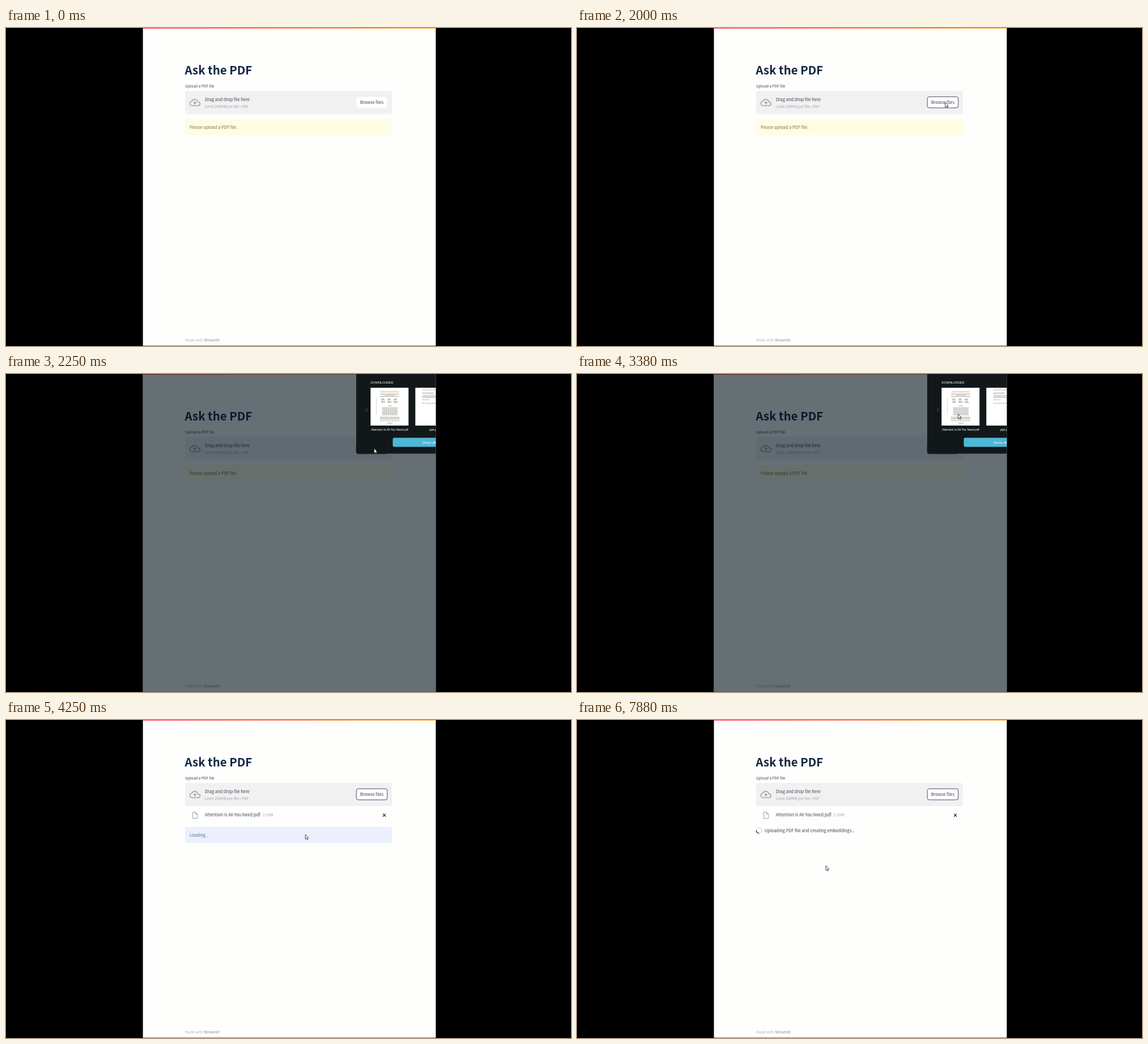
Animation, 997 px wide and 561 px high, one loop 8 s. Source, as an HTML page:

```html
<!DOCTYPE html>
<html lang="en">
<head>
<meta charset="utf-8">
<title>Ask the PDF</title>
<style>
  html, body { margin: 0; width: 100%; height: 100%; overflow: hidden; background: #000; }
  svg { display: block; width: 100vw; height: 100vh; }
  text { font: 7.43px "Noto Sans CJK JP", "Noto Sans CJK SC", "Noto Sans CJK", "Noto Sans", sans-serif; fill: #3f4152; }
  .title { font-size: 20.4px; font-weight: 700; fill: #102643; }
  .small { font-size: 6.5px; }
  .faint { fill: #a2a3ab; }
  .picker text { font: 5.2px "Liberation Sans", Arial, sans-serif; fill: #fff; }
  .ink { stroke: #8f8f83; stroke-width: .8; fill: none; }
  .ink path:nth-child(-n+2) { stroke: #dfa077; }
</style>
</head>
<body>
<svg viewBox="0 0 997 561" preserveAspectRatio="none">
  <defs>
    <clipPath id="pageClip"><rect x="241.6" width="516.8" height="560.4"/></clipPath>
    <linearGradient id="bar">
      <stop stop-color="#ff4b6b"/><stop offset="1" stop-color="#ffb84a"/>
    </linearGradient>
  </defs>

  <g clip-path="url(#pageClip)">
    <rect x="241" width="518" height="561" fill="#fefefc"/>
    <rect x="241" width="518" height="1.2" fill="url(#bar)"/>

    <text class="title" x="315.6" y="81.8">Ask the PDF</text>
    <text class="small" x="316" y="105">Upload a PDF file</text>

    <rect x="316" y="111" width="365" height="41" rx="4" fill="#f1f1f2"/>
    <g transform="translate(323.7 121.6) scale(.8125)">
      <path d="M19 19H6a5 5 0 0 1-.6-9.97A7 6.9 0 0 1 18.5 11h.5a4 4 0 0 1 0 8z"
            fill="none" stroke="#a2a4b3" stroke-width="2"/>
      <path d="M8 13h2.5v3h3v-3H16l-4-4z" fill="#a2a4b3"/>
    </g>
    <text x="351" y="128.6">Drag and drop file here</text>
    <text class="small faint" x="351" y="140.9">Limit 200MB per file • PDF</text>
    <rect id="browse" x="618.2" y="121.3" width="54.6" height="19.6" rx="3.5" fill="#fff"/>
    <text x="645.4" y="134.1" text-anchor="middle">Browse files</text>

    <g id="warning">
      <rect x="316" y="160" width="365.5" height="29" rx="3" fill="#fefde4"/>
      <text x="324" y="177.8" style="fill:#86702a">Please upload a PDF file.</text>
    </g>

    <g id="fileRow">
      <path d="M329.5 162.5h5l3.5 3.5v7.5h-8.5zM334.2 162.7v3.5h3.6" fill="none" stroke="#9b9da9"/>
      <text x="351" y="170.2">Attention Is All You Need.pdf</text>
      <text class="small faint" x="453" y="170.1">2.1MB</text>
      <path d="M665 165.3l5.2 5.2m0-5.2l-5.2 5.2" stroke="#20222c" stroke-width="1.1"/>
    </g>

    <g id="loading">
      <rect x="316" y="188.5" width="365" height="28.5" rx="3" fill="#ecf0fc"/>
      <text x="324" y="205.8" style="fill:#56708a">Loading...</text>
    </g>

    <g id="busy">
      <g fill="none" stroke-width="1.5">
        <circle cx="321.2" cy="194.8" r="4.9" stroke="#dcdce0"/>
        <path id="arc" d="M317.74 191.34A4.9 4.9 0 0 1 324.66 191.34" stroke="#31333f"/>
      </g>
      <text x="331" y="197.6">Uploading PDF file and creating embeddings...</text>
    </g>

    <text class="small" x="316" y="552.6" style="fill:#b0b0c6">Made with <tspan fill="#8384a2">Streamlit</tspan></text>

    <rect id="dim" x="241" width="518" height="561" fill="#02121c" opacity=".6"/>

    <g id="picker" class="picker">
      <rect x="618" y="-6" width="260" height="146.4" rx="4" fill="#12181a"/>
      <text x="643.6" y="17" style="font-size:5.5px">DOWNLOADED</text>
      <path d="M638 60.5l-2.6 2.7 2.6 2.7" fill="none" stroke="#77776a" stroke-width=".8"/>
      <rect x="643.3" y="24.3" width="67" height="66.7" fill="#fff"/>
      <rect x="722.3" y="24.3" width="67" height="66.7" fill="#fff"/>
      <g id="paper" class="ink"></g>
      <text x="677" y="100.3" text-anchor="middle">Attention Is All You Need.pdf</text>
      <text x="747" y="100.3">ppe.pdf</text>
      <rect x="682.5" y="112.5" width="131" height="16" rx="2.5" fill="#4fb7d6"/>
      <text x="735" y="122.6" style="font-size:6.2px">Show all</text>
    </g>
  </g>

  <path id="cursor" d="M0 0V8.2L1.9 6.5 3.2 9.4 4.5 8.8 3.2 6H5.7Z" fill="#fff" stroke="#222" stroke-width=".8"/>
</svg>

<script>
const LOOP = 8000, STEP = 125;
const el = id => document.getElementById(id);
const show = (id, on) => el(id).setAttribute("visibility", on ? "visible" : "hidden");

// Lines of tiny print: x, y, width, rows, dash
const print = [
  [661, 30.5, 32, 2, "1.4 .5"], [660, 35.5, 34, 1, ""], [669, 37.5, 17, 1, "3 .7"], [660, 39.5, 34, 1, ""],
  [662, 44, 31, 2, "6 5"], [662, 48.5, 31, 2, "7 4"],
  [674, 56, 7, 1, ""], [664, 59.5, 27, 8, "2.6 .6"], [660, 76, 34, 3, "2.2 .5"], [660, 82.5, 34, 1, "4 1"],
  [673, 86.5, 9, 1, ""],
  [735, 28, 28, 1, "3 .6"], [735, 33, 20, 2, "2 .8"], [735, 38, 28, 3, "2.4 .7"],
  [735, 45.5, 12, 1, "2 .6"], [735, 51.5, 30, 1, "3 1"]
];
el("paper").innerHTML = print.map(([x, y, w, rows, dash]) =>
  Array.from({ length: rows }, (_, i) =>
    `<path d="M${x} ${y + i * 1.8}h${w}" stroke-dasharray="${dash}"/>`).join("")
).join("") + '<path d="M653.5 43v28" stroke-dasharray="2 .8" opacity=".6"/>';

// Pointer path: time, x, y
const path = [
  [500, 757, 192], [625, 735, 178], [750, 702, 158], [875, 672, 146], [1250, 652, 134], [1500, 649.7, 131.5],
  [2500, 649.7, 131.5], [3125, 672.7, 70.7], [3625, 672.7, 70.7],
  [4250, 528.2, 202], [5125, 439.2, 257], [LOOP, 439.2, 257]
];

function pointAt(t) {
  const i = path.findIndex(p => p[0] > t);
  const [t0, x0, y0] = path[i - 1], [t1, x1, y1] = path[i];
  const u = (t - t0) / (t1 - t0), e = u * u * (3 - 2 * u);
  return [x0 + (x1 - x0) * e, y0 + (y1 - y0) * e];
}

function draw(t) {
  const closing = t === 3500;
  show("warning", t < 3750);
  show("fileRow", t >= 3750);
  show("loading", t >= 3750 && t < 4375);
  show("busy", t >= 4375);
  show("dim", t >= 2250 && t < 3500);
  show("picker", t >= 2250 && t <= 3500);
  el("picker").setAttribute("opacity", closing ? .78 : 1);
  el("picker").setAttribute("transform",
    closing ? "translate(748 70) scale(.985) translate(-748 -70)" : "");

  el("browse").setAttribute("stroke", t >= 1000 ? "#474b6c" : "#f4f4f6");
  el("arc").setAttribute("transform", `rotate(${(t - 6250) * .36} 321.2 194.8)`);

  show("cursor", t >= path[0][0]);
  if (t >= path[0][0]) el("cursor").setAttribute("transform", `translate(${pointAt(t)})`);
}

function tick() {
  const t = performance.now() % LOOP;
  draw(Math.floor((t + 1) / STEP) * STEP % LOOP);
  requestAnimationFrame(tick);
}
tick();
</script>
</body>
</html>
```
